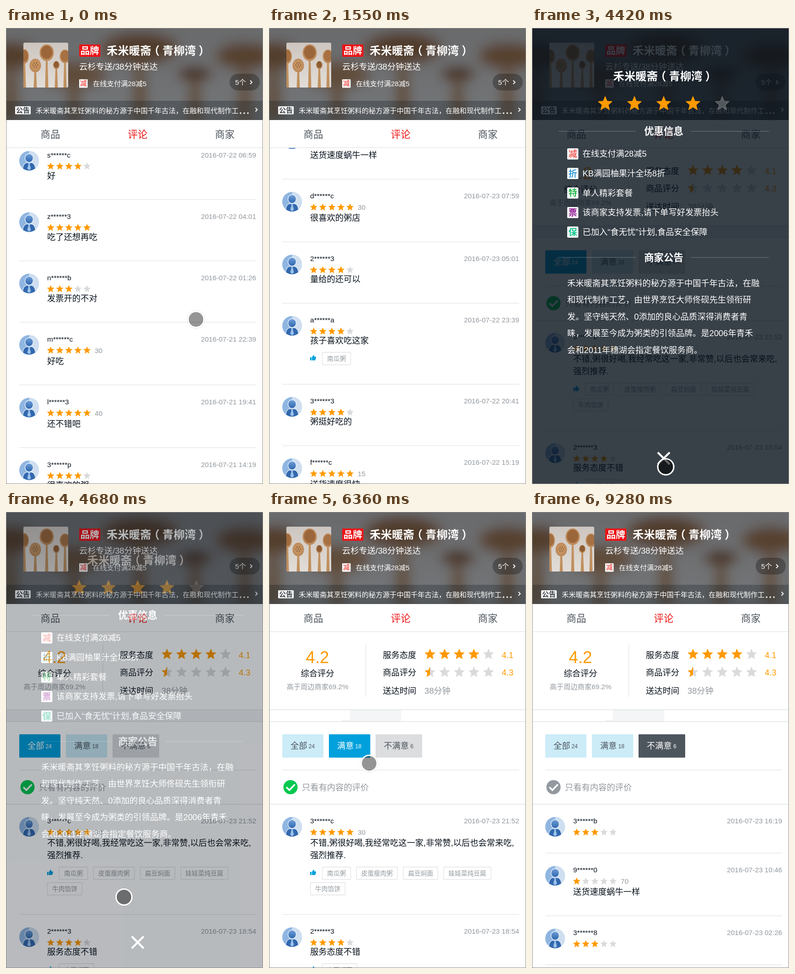
Write an HTML page that moves like this. It is 562 px wide and 996 px high and loops after 9.8 s.

```html
<!DOCTYPE html>
<html lang="zh-CN">
<head>
<meta charset="utf-8">
<title>商家评论</title>
<style>
html, body { margin: 0; width: 100%; height: 100%; overflow: hidden; background: #fff; }
svg { display: block; width: 562px; height: 996px; }
text { font-family: "Liberation Sans", "Noto Sans CJK SC", "Noto Sans CJK", sans-serif; white-space: pre; }
.b { font-weight: 700; }
</style>
</head>
<body>
<svg id="stage" viewBox="0 0 562 996" xmlns="http://www.w3.org/2000/svg"></svg>
<script>
const INK = '#07111b', GREY = '#93999f', SLATE = '#4d555d', LINE = '#e2e3e5';
const ORANGE = '#ff9900', OFF = '#d9dadc', BLUE = '#00a0dc';
const SHOP = '禾米暖斋<tspan dx="-6">（</tspan><tspan dx="6">青柳湾</tspan><tspan dx="6">）</tspan>';
const LOOP = 9800;

// ---------- drawing helpers ----------
// y is the visual middle of the line
function text(x, y, str, size, fill = INK, anchor = 'start', cls = '') {
  return `<text x="${x}" y="${y + size * .365}" font-size="${size}" fill="${fill}" text-anchor="${anchor}" class="${cls}">${str}</text>`;
}
function rect(x, y, w, h, fill, r = 0, extra = '') {
  return `<rect x="${x}" y="${y}" width="${w}" height="${h}" rx="${r}" fill="${fill}" ${extra}/>`;
}
function ellipse(x, y, rx, ry, fill, extra = '') {
  return `<ellipse cx="${x}" cy="${y}" rx="${rx}" ry="${ry}" fill="${fill}" ${extra}/>`;
}
function stroke(d, color, w, extra = '') {
  return `<path d="${d}" fill="none" stroke="${color}" stroke-width="${w}" ${extra}/>`;
}
function hline(x1, x2, y, color = LINE) {
  return rect(x1, y - .5, x2 - x1, 1.2, color);
}
function star(x, y, R, fill) {
  const pts = [];
  for (let i = 0; i < 10; i++) {
    const r = i % 2 ? R * .45 : R, a = i * Math.PI / 5 - Math.PI / 2;
    pts.push((x + r * Math.cos(a)).toFixed(2) + ',' + (y + R * .095 + r * Math.sin(a)).toFixed(2));
  }
  return `<polygon points="${pts.join(' ')}" fill="${fill}" stroke="${fill}" stroke-width="${R * .07}" stroke-linejoin="round"/>`;
}
function stars(x, y, step, R, score, off = OFF) {
  let s = '';
  for (let i = 0; i < 5; i++) {
    const left = score - i;
    s += star(x + i * step, y, R, left >= 1 ? ORANGE : left > 0 ? 'url(#half)' : off);
  }
  return s;
}

// ---------- rating list ----------
function rating(name, date, score, lines = [], mins = 0, tags = []) {
  return { name, date: '2016-07-' + date, score, lines, mins, tags };
}
const slow = rating('9******0', '23 10:46', 1, ['送货速度蜗牛一样'], 70);
const invoice = rating('n******b', '22 01:26', 3, ['发票开的不对']);
const all = [
  rating('3******c', '23 21:52', 5, ['不错,粥很好喝,我经常吃这一家,非常赞,以后也会常来吃,', '强烈推荐.'], 30,
    ['南瓜粥', '皮蛋瘦肉粥', '扁豆焖面', '娃娃菜炖豆腐', '牛肉馅饼']),
  rating('2******3', '23 18:54', 4, ['服务态度不错'], 0, ['扁豆焖面']),
  slow,
  rating('d******c', '23 07:59', 5, ['很喜欢的粥店'], 30),
  rating('2******3', '23 05:01', 4, ['量给的还可以']),
  rating('a******a', '22 23:39', 4, ['孩子喜欢吃这家'], 0, ['南瓜粥']),
  rating('3******3', '22 20:41', 4, ['粥挺好吃的']),
  rating('f******c', '22 15:19', 5, ['送货速度很快'], 15),
  rating('s******c', '22 06:59', 4, ['好']),
  rating('z******3', '22 04:01', 5, ['吃了还想再吃']),
  invoice,
  rating('m******c', '21 22:39', 5, ['好吃'], 30),
  rating('l******3', '21 19:41', 5, ['还不错吧'], 40),
  rating('3******p', '21 14:19', 4, ['很喜欢的粥'])
];
const badWithText = [slow, invoice];
const bad = [rating('3******b', '23 16:19', 3), slow, rating('3******8', '23 02:26', 3)];

function avatar(x, y) {
  return `<g transform="translate(${x} ${y})" clip-path="url(#disc)">` +
    rect(-22, -22, 44, 44, '#8fb5e1') + rect(0, -22, 22, 44, '#cfdff0') +
    `<path d="M-14 24C-15 9-9 4-4 4H4C9 4 15 9 14 24Z" fill="#3268ae" stroke="#dfeaf6" stroke-width="1.3"/>` +
    ellipse(0, -6, 9, 9.5, 'url(#face)', 'stroke="#e3eef9" stroke-width="1.5"') +
    `<path d="M-2.5 5H2.5L1.5 8L4 17L0 21L-4 17L-1.5 8Z" fill="#9cc3ec"/></g>`;
}
function thumb(x, y) {
  return `<path transform="translate(${x} ${y})" fill="${BLUE}" d="M0 5H3V12H0ZM4 5L7.5 0Q9.4 .4 8.6 4H12Q13.4 4.4 12.8 6L11.4 11Q11 12 10 12H4Z"/>`;
}
function tagRow(tags, top) {
  let x = 116.5, y = top, s = thumb(90, top - 8);
  for (const t of tags) {
    const w = t.length * 13.73 + 21;
    if (x + w > 547) { x = 90.5; y += 34; }
    s += rect(x, y - 13.5, w, 27, 'none', 1, `stroke="${LINE}" stroke-width="1.3"`) +
      text(x + w / 2, y, t, 13.73, GREY, 'middle');
    x += w + 12.6;
  }
  return { s, extra: y - top };
}
function list(items) {
  let y = 638, s = '';
  for (const it of items) {
    const late = it.mins ? 3 : 0;
    s += avatar(50.5, y + 49.5) + text(90, y + 36.8, it.name, 15.3) +
      text(547, y + 36.8, it.date, 15.3, GREY, 'end') + stars(97.7, y + 61, 19.85, 7.9, it.score);
    if (it.mins) s += text(194, y + 61.5, it.mins, 15.3, GREY);
    it.lines.forEach((l, i) => s += text(90, y + 81.5 + late + i * 27, l, 18.3));
    let h = (it.lines.length ? 134 + (it.lines.length - 1) * 27 : 107) + late;
    if (it.tags.length) {
      const row = tagRow(it.tags, y + h - 13);
      s += row.s;
      h += 43 + row.extra;
    }
    y += h;
    s += hline(29, 547, y);
  }
  return s;
}

// ---------- page parts ----------
function overview() {
  return text(106, 317, '4.2', 36.6, ORANGE, 'middle') + text(106, 352, '综合评分', 18.3, INK, 'middle') +
    text(106, 381, '高于周边商家69.2%', 15.3, GREY, 'middle') + rect(211, 289, 1.2, 115, LINE) +
    text(249, 312, '服务态度', 18.3) + stars(352, 310, 32, 11.8, 4) + text(509, 312, '4.1', 18.3, ORANGE) +
    text(249, 350.5, '商品评分', 18.3) + stars(352, 349, 32, 11.8, .5) + text(509, 350.5, '4.3', 18.3, ORANGE) +
    text(249, 390, '送达时间', 18.3) + text(340, 390, '38分钟', 18.3, GREY);
}
function band() {
  return `<g id="bandFull">${rect(0, 432, 562, 26, '#f3f5f7')}</g>` +
    `<g id="bandPart">${rect(177, 432, 112, 26, '#f3f5f7')}${hline(160, 177, 456)}</g>` +
    hline(0, 562, 431.8, '#dcdddf') + hline(0, 562, 457.8, '#dcdddf');
}
const tabs = [
  { x: 29, w: 90, label: '全部', n: 24, idle: '#ccecf8', on: BLUE },
  { x: 131, w: 90.5, label: '满意', n: 18, idle: '#ccecf8', on: BLUE },
  { x: 233, w: 102, label: '不满意', n: 6, idle: '#dbdddf', on: SLATE }
];
function filters() {
  return tabs.map((t, i) => `<g id="tab${i}" fill="${SLATE}">` + rect(t.x, 485.5, t.w, 51, t.idle, 1.5) +
    text(t.x + 18, 510, t.label, 18.3, 'inherit') +
    text(t.x + 21 + t.label.length * 18.3, 512, t.n, 12.2, 'inherit') + '</g>').join('') +
    hline(29, 547, 563.5) + `<circle id="check" cx="47" cy="601" r="15.5"/>` +
    stroke('M38 601L44.5 607.5L56.5 595', '#fff', 3.6) +
    text(72, 601, '只看有内容的评价', 18.3, GREY) + hline(0, 562, 638.2, '#dcdddf');
}
function spoon(x, y, rx, ry, bowl) {
  return `<path d="M${x - 1.5} ${y}H${x + 1.5}L${x + 3.5} 130H${x - 3.5}Z" fill="#c0905f"/>` +
    ellipse(x, y, rx, ry, '#bd8a5a') + ellipse(x, y - 1, rx * .8, ry * .8, bowl);
}
function photo() {
  let s = rect(38, 32, 98, 98, 'url(#wall)') + spoon(40, 62, 10, 16, '#a16c3e') + spoon(64, 82, 12.5, 15, '#c3905f') +
    spoon(89, 54, 15.5, 18, '#9b663a') + spoon(110, 81, 7, 9, '#8d5c34') + spoon(129, 62, 11.5, 15, '#a77143');
  for (let i = 0; i < 7; i++) {
    const a = i * Math.PI / 3, r = i ? 5 : 0;
    s += ellipse(64 + r * Math.cos(a), 81 + r * Math.sin(a), 1.1, 1.1, '#6f4a2b');
  }
  return s;
}
function chevron(x, y) {
  return stroke(`M${x - 2} ${y - 4}L${x + 2} ${y}L${x - 2} ${y + 4}`, '#fff', 1.8);
}
// the photo again, stretched over the header, blurred and dimmed
function backdrop() {
  return rect(0, 0, 562, 201, '#cfc8c2') + '<g clip-path="url(#head)"><g filter="url(#soft)">' +
    `<g transform="scale(5.735 2.051) translate(-38 -32)">${photo()}</g></g></g>` +
    rect(0, 0, 562, 201, INK, 0, 'opacity=".5"') + rect(0, 159, 562, 42, INK, 0, 'opacity=".25"');
}
function header() {
  return backdrop() + `<g clip-path="url(#photo)">${photo()}</g>` +
    rect(160, 36, 46.5, 27, '#ea1519', 2) + text(183.2, 49.5, '品牌', 20.5, '#fff', 'middle', 'b') +
    text(220, 49.5, SHOP, 24.4, '#fff', 'start', 'b') + text(160, 84, '云杉专送/38分钟送达', 18.3, '#fff') +
    rect(160, 112, 18.5, 18.5, '#fff', 1) + text(169.2, 121.2, '减', 14.5, '#f0645f', 'middle', 'b') +
    text(190, 121.5, '在线支付满28减5', 15.3, '#fff') +
    rect(489, 100, 66, 36.5, '#000', 18.2, 'opacity=".28"') + text(501, 118, '5个', 15.3, '#fff') + chevron(536, 118.5) +
    rect(20, 171, 34, 17.5, '#fff', 1.5) + text(37, 179.8, '公告', 15, '#3d4148', 'middle', 'b') +
    text(65, 180, '禾米暖斋其烹饪粥料的秘方源于中国千年古法，在融和现代制作工', 15.3, '#fff') +
    [513, 521, 529].map(x => rect(x - 1.5, 184.5, 3, 3, '#fff')).join('') + chevron(547.5, 178.5) +
    rect(0, 201, 562, 60, '#fff') + hline(0, 562, 261.3) +
    text(97, 232, '商品', 21.4, SLATE, 'middle') + text(288, 232, '评论', 21.4, '#f01414', 'middle') +
    text(478.5, 232, '商家', 21.4, SLATE, 'middle');
}
function section(y, title) {
  const rule = 'rgba(255,255,255,.25)';
  return hline(58, 227, y, rule) + hline(348, 518, y, rule) + text(288, y, title, 21.4, '#fff', 'middle', 'b');
}
function detail() {
  const deals = [
    ['减', '#f0625c', '在线支付满28减5'], ['折', '#3a9fd8', 'KB满园柚果汁全场8折'], ['特', '#25b84a', '单人精彩套餐'],
    ['票', '#8f1a90', '该商家支持发票,请下单写好发票抬头'], ['保', '#14c48e', '已加入“食无忧”计划,食品安全保障']
  ];
  const notice = [
    '禾米暖斋其烹饪粥料的秘方源于中国千年古法，在融', '和现代制作工艺，由世界烹饪大师佟砚先生领衔研',
    '发。坚守纯天然、0添加的良心品质深得消费者青', '睐，发展至今成为粥类的引领品牌。是2006年青禾',
    '会和2011年穗湖会指定餐饮服务商。'
  ];
  return rect(0, 0, 562, 996, 'rgba(7,17,27,.8)') + text(177.5, 105, SHOP, 24.4, '#fff', 'start', 'b') +
    stars(160, 164, 64, 16, 4, 'rgba(216,216,216,.32)') + section(225.5, '优惠信息') +
    deals.map(([mark, color, label], i) => {
      const y = 275 + i * 42.7;
      return rect(77, y - 12.2, 24.4, 24.4, '#fff', 2) + text(89.2, y, mark, 19, color, 'middle', 'b') +
        text(110.5, y - .5, label, 18.3, '#fff');
    }).join('') + section(501, '商家公告') +
    notice.map((l, i) => text(77, 557 + i * 36.6, l, 18.3, '#fff')).join('') +
    stroke('M275 927L301 953M301 927L275 953', '#fff', 4.4);
}
function defs() {
  const stops = (a, b) => `<stop offset="0" stop-color="${a}"/><stop offset="1" stop-color="${b}"/>`;
  return `<defs><clipPath id="disc"><circle r="21.5"/></clipPath>
    <clipPath id="photo"><rect x="38" y="32" width="98" height="98" rx="3"/></clipPath>
    <clipPath id="head"><rect width="562" height="201"/></clipPath>
    <filter id="soft"><feGaussianBlur stdDeviation="13"/></filter>
    <linearGradient id="wall" x2="0" y2="1">${stops('#cdc5bf', '#e2ddd8')}</linearGradient>
    <linearGradient id="face" x2="0" y2="1">${stops('#6f9fd8', '#2f66ae')}</linearGradient>
    <linearGradient id="half"><stop offset=".5" stop-color="${ORANGE}"/><stop offset=".5" stop-color="${OFF}"/></linearGradient></defs>`;
}

const stage = document.getElementById('stage');
stage.innerHTML = defs() + rect(0, 0, 562, 996, '#fff') +
  `<g id="page">${overview()}${band()}${filters()}<g id="list0">${list(all)}</g><g id="list1">${list(badWithText)}</g><g id="list2">${list(bad)}</g></g>` +
  header() + `<g id="detail">${detail()}</g>` +
  `<g id="cursor"><circle r="19.3" fill="none" stroke="rgba(0,0,0,.18)" stroke-width=".8"/><circle id="dot" r="17.5" stroke="#fff" stroke-width="3.2"/></g>` +
  rect(.5, .5, 561, 995, 'none', 0, 'stroke="#8b8b8d"');
const $ = id => document.getElementById(id);

// ---------- motion ----------
// moments at which the picture refreshes; it holds in between
const ticks = [0, 120, 540, 860, 1000, 1130, 1280, 1400, 1550, 1820, 2070, 2400, 2680, 2810, 3080, 3500, 3630, 3760,
  3900, 4030, 4160, 4420, 4560, 4680, 5030, 5160, 5290, 5420, 5550, 5680, 5960, 6100, 6230, 6360, 6490, 6620, 6750, 6900,
  7040, 7170, 7300, 7430, 7830, 8090, 8220, 8350, 8490, 8620, 8760, 8890, 9020, 9150, 9280];
const scrollKeys = [[0, 1671.5], [120, 1600], [540, 1400], [860, 1371], [1130, 1371], [1280, 1290], [1400, 1110],
  [1550, 863], [1820, 340], [2070, 110], [2400, 14], [2680, 0]];
const fadeKeys = [[2810, 0], [3080, .055], [3500, .6], [3630, .9], [3760, 1], [4420, 1], [4560, .85], [4680, .36], [5030, .04], [5160, 0]];
const cursorKeys = [[0, 415.5, 636.5], [120, 408, 708], [540, 390, 908], [860, 387, 936], [1130, 362, 566], [1400, 352, 827],
  [1550, 345, 1040], [2070, 505, 1040], [2400, 505, 189], [2810, 509, 122], [3080, 509, 122], [3760, 371, 695],
  [4160, 292.5, 958.5], [4420, 292.5, 958.5], [4680, 258, 841], [5680, 178, 506], [6230, 178, 505], [6360, 219, 549],
  [6620, 255, 680], [6900, 282, 515], [7040, 282, 506], [7430, 50.5, 601], [7830, 51, 603], [8350, 89, 619],
  [8620, 409, 765], [9150, 523, 980], [9280, 540, 1040]];

function at(keys, t) {
  const i = keys.findIndex(k => k[0] > t);
  if (i < 0) return keys[keys.length - 1].slice(1);
  if (i === 0) return keys[0].slice(1);
  const a = keys[i - 1], b = keys[i], p = (t - a[0]) / (b[0] - a[0]);
  return a.slice(1).map((v, j) => v + (b[j + 1] - v) * p);
}
function show(id, on) { $(id).style.display = on ? '' : 'none'; }

let last = -1;
function draw(t) {
  if (t === last) return;
  last = t;
  $('page').setAttribute('transform', `translate(0 ${-at(scrollKeys, t)[0]})`);
  const fade = at(fadeKeys, t)[0];
  show('detail', fade > 0);
  $('detail').style.opacity = fade;

  const active = t < 6230 ? 0 : t < 6900 ? 1 : 2;
  tabs.forEach((tab, i) => {
    const g = $('tab' + i);
    g.setAttribute('fill', i === active ? '#fff' : SLATE);
    g.firstChild.setAttribute('fill', i === active ? tab.on : tab.idle);
  });
  const view = t < 6900 ? 0 : t < 7830 ? 1 : 2;
  for (let i = 0; i < 3; i++) show('list' + i, i === view);
  $('check').setAttribute('fill', view === 2 ? GREY : '#00c850');
  show('bandFull', t < 5160);
  show('bandPart', t >= 5160);

  const [x, y] = at(cursorKeys, t);
  $('cursor').setAttribute('transform', `translate(${x} ${y})`);
  $('dot').setAttribute('fill', `rgba(0,0,0,${t === 3080 || t === 4420 ? .6 : .42})`);
}
const start = performance.now();
function frame() {
  const t = (performance.now() - start) % LOOP;
  draw(ticks.filter(k => k <= t).pop() || 0);
  requestAnimationFrame(frame);
}
frame();
</script>
</body>
</html>
```
